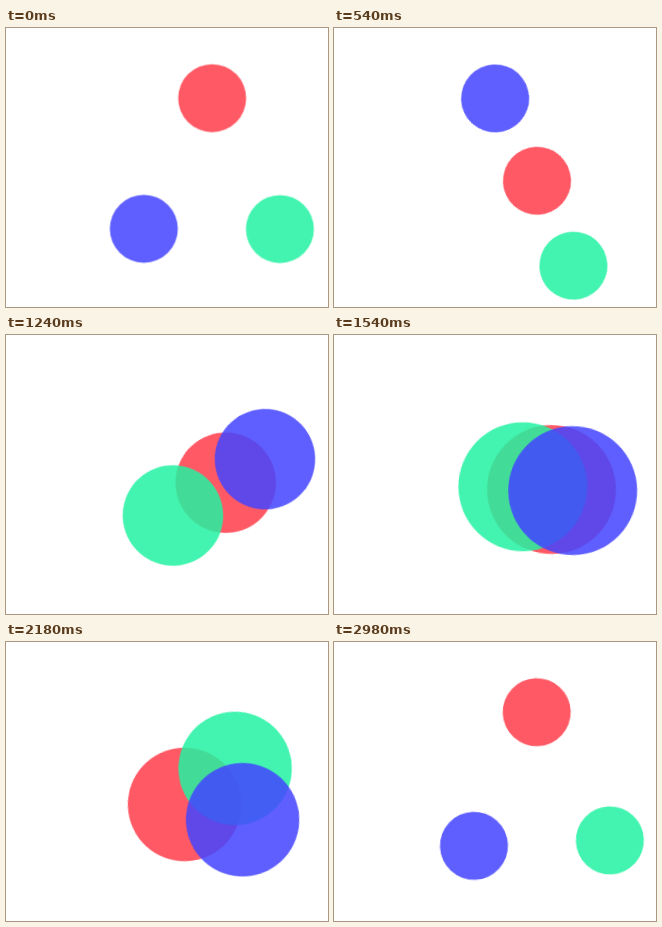
Write an HTML page without scripts that moves like this. It is 322 px wide and 279 px high and loops after 3000 ms.

```html
<!DOCTYPE html>
<html lang="en">
<head>
<meta charset="utf-8">
<title>Three dots loader</title>
<style>
  html, body { margin: 0; width: 100%; height: 100%; overflow: hidden; background: #fff; }
  svg { display: block; width: 100%; height: 100%; }

  .spin { animation: spin 3s linear infinite; }
  circle { opacity: .85; animation: 3s linear infinite; }
  .red { fill: #ff3d4a; animation-name: red, grow; }
  .green { fill: #21f3a2; animation-name: green, grow; }
  .blue { fill: #4444ff; animation-name: blue, grow; }

  @keyframes spin { to { transform: rotate(360deg); } }

  @keyframes grow {
    0%, 30%, 86.67%, 100% { scale: 1; }
    56.67%, 63.33% { scale: 2.118; }
  }

  /* triangle, line, merged, triangle */
  @keyframes red {
    0%, 93.33%, 100% { translate: -3.5px -82.5px; }
    18% { translate: -2.5px 6px; }
    28.33% { translate: -3px 3px; }
    41.33% { translate: -11.2px -1.2px; }
    60% { translate: -5.5px -1.5px; }
    72.67% { translate: -5.4px -32px; }
    84.67% { translate: -3px -57.6px; }
  }
  @keyframes green {
    0%, 90%, 100% { translate: 64.5px 48.5px; }
    18% { translate: 89.8px 9px; }
    22% { translate: 93.3px 7px; }
    28.33% { translate: 93.3px 4px; }
    41.33% { translate: 51px -2px; }
    60% { translate: -5.5px 0; }
    62% { translate: -4.8px 3.4px; }
    72.67% { translate: 22.9px 23.1px; }
    84.67% { translate: 52.6px 45px; }
  }
  @keyframes blue {
    0%, 90%, 100% { translate: -71.5px 48.5px; }
    18% { translate: -94.8px 9px; }
    22% { translate: -98.5px 7px; }
    28.33% { translate: -98.5px 4px; }
    41.33% { translate: -57.1px -1.3px; }
    60% { translate: -5.5px 0; }
    62% { translate: -5.8px 3.4px; }
    72.67% { translate: -28.8px 23.1px; }
    84.67% { translate: -53.8px 45.2px; }
  }
</style>
</head>
<body>
<svg viewBox="0 0 322 279">
  <g transform="translate(209.5 152.5)">
    <g class="spin">
      <circle class="red" r="34"/>
      <circle class="green" r="34"/>
      <circle class="blue" r="34"/>
    </g>
  </g>
</svg>
</body>
</html>
```
